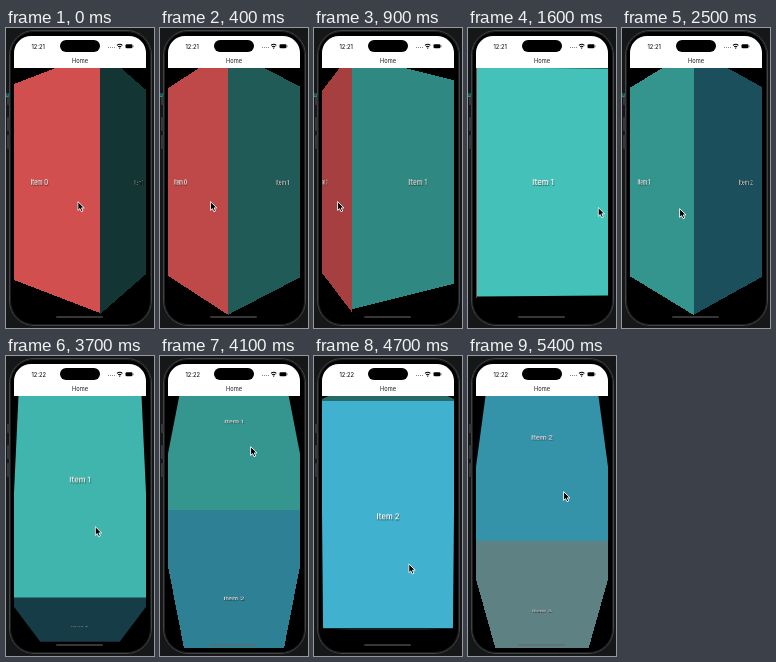
An HTML page that plays this animation: 148x300 px, repeating every 5.5 s.

```html
<!DOCTYPE html>
<html lang="en">
<head>
<meta charset="utf-8">
<title>Cube carousel</title>
<style>
  html, body { margin: 0; width: 100%; height: 100%; overflow: hidden; background: #161718; }
  body { position: relative; font-family: Inter, sans-serif; }
  body * { position: absolute; box-sizing: border-box; }
  #stage { left: 0; top: 0; width: 148px; height: 300px; overflow: hidden; }
  #code { left: -1px; top: 63px; font: bold 7px/9px "DejaVu Sans Mono", monospace; color: #1f9f98; }
  .key { left: 1px; width: 3px; background: #35373a; border-radius: 1px; }
  #phone { left: 2.5px; top: 2px; width: 143px; height: 296px; border: 1px solid #414244;
    border-radius: 25px; background: #000; box-shadow: inset 0 0 0 1px #1d1e20; }
  #screen { left: 8px; top: 8px; width: 131.5px; height: 284px; overflow: hidden;
    border-radius: 17px; background: #000; }
  .face { left: 0; top: 32px; width: 132px; height: 228px; display: flex; align-items: center;
    justify-content: center; backface-visibility: hidden; }
  .face i { inset: 0; }
  .face span { font-size: 7.6px; font-weight: 600; color: #fff; white-space: nowrap;
    text-shadow: .5px .6px 1px #0009; }
  #header { left: 0; top: 0; width: 132px; height: 32.4px; background: #fff; color: #1a1a1a; }
  #clock { left: 17.5px; top: 6.7px; font-size: 5.7px; line-height: 7px; font-weight: 500; }
  #title { left: 0; width: 132px; top: 21px; text-align: center; font-size: 5.7px;
    line-height: 7px; }
  #island { left: 46px; top: 4px; width: 40px; height: 12px; border-radius: 6px; background: #000; }
  #status { left: 92px; top: 6px; }
  #bar { left: 42px; top: 279.5px; width: 47px; height: 2px; border-radius: 1px; background: #6668; }
  #cursor { left: 0; top: 0; }
</style>
</head>
<body>
<div id="stage">
  <div id="phone"></div>
  <div class="key" style="top:68px;height:9px"></div>
  <div class="key" style="top:89px;height:14px"></div>
  <div class="key" style="top:107px;height:14px"></div>
  <div id="code">u</div>
  <div id="screen">
    <div id="cube"></div>
    <div id="header">
      <div id="clock"></div>
      <div id="island"></div>
      <svg id="status" width="32" height="10">
        <path d="M2 5.5h7" stroke="#888" stroke-dasharray="1 1"/>
        <path d="M11 3.4q2.7-2.3 5.4 0M12.2 4.8q1.5-1.2 3 0M13.2 6.1h1" fill="none" stroke="#000" stroke-width="1.1"/>
        <rect x="19.5" y="2.3" width="7" height="4" rx="1.2"/>
        <path d="M27.3 3.5v1.6" stroke="#777" stroke-width=".8"/>
      </svg>
      <div id="title">Home</div>
    </div>
    <div id="bar"></div>
  </div>
  <svg id="cursor" width="10" height="13">
    <path d="M.6.6v8.8l2-1.8 1.4 3.1 1.7-.7-1.4-3.1h2.7z" stroke="#fff" stroke-width=".9"/>
  </svg>
</div>
<script>
const LOOP = 5500, STEP = 100, CUT = 2600;
const WIDTH = 132, HEIGHT = 228;
const SLOP = 6;     // pixels a drag travels before the cube follows
const SETTLE = 215; // time constant of the snap after release
const colors = ['#ff6060', '#45c3bb', '#40b2cf', '#9ad3d8'];

// Pointer strokes; those with a page drag the cube away from it.
const strokes = [
  { start: -1030, end: 900, from: [126.5, 173], to: [23, 173], page: 0 },
  { start: 1650, end: 2500, from: [131, 179], to: [57, 180], page: 1 },
  { start: CUT, end: 3000, from: [86, 150], to: [86, 160] },
  { start: 3500, end: 4100, from: [88, 210], to: [90, 90], page: 1 },
  { start: 4900, end: 5400, from: [95, 229], to: [95, 135], page: 2 }
];
const drags = strokes.filter(s => 'page' in s);

const $ = id => document.getElementById(id);
const clamp = v => Math.min(1, Math.max(0, v));
const smooth = v => v * v * (3 - 2 * v);
const mix = (a, b, f) => a.map((v, i) => v + (b[i] - v) * f);
const progress = (t, start, end) => clamp((t - start) / (end - start));

const faces = colors.map((color, i) => {
  const face = document.createElement('div');
  face.className = 'face';
  face.innerHTML = `<i style="background:${color}"></i><span>Item ${i}</span>`;
  $('cube').append(face);
  return face;
});

function pointerAt(t) {
  const i = strokes.findLastIndex(s => s.start <= t);
  const stroke = strokes[i], next = strokes[i + 1];
  if (t <= stroke.end || !next)
    return mix(stroke.from, stroke.to, progress(t, stroke.start, stroke.end));
  return mix(stroke.to, next.from, smooth(progress(t, stroke.end, next.start)));
}

function positionAt(t) {
  const i = drags.findLastIndex(d => d.start <= t);
  const { start, end, from, to, page } = drags[i];
  const axis = start < CUT ? 0 : 1;
  const travel = (from[axis] - to[axis]) * progress(t, start, end);
  const position = page + Math.max(0, travel - SLOP) / (axis ? HEIGHT : WIDTH);
  if (t <= end) return position;
  const rest = drags[i + 1].page;
  return rest + (position - rest) * Math.exp((end - t) / SETTLE);
}

function shade(v, vertical) {
  if (v < 0) return clamp(1 + .47 * v);
  return Math.max(.15, vertical ? 1 - .85 * v ** 1.6 : 1 - 1.15 * v);
}

function draw(t) {
  const vertical = t >= CUT;
  const [x, y] = pointerAt(t);
  const position = positionAt(t);
  const size = vertical ? HEIGHT : WIDTH;
  const depth = size / 2 / Math.tan(Math.PI / 6); // six-sided prism
  faces.forEach((face, i) => {
    const v = i - position;
    const turn = vertical ? `rotateX(${-60 * v}deg)` : `rotateY(${60 * v}deg)`;
    const flare = `scale${vertical ? 'X' : 'Y'}(${1 + .04 * v * v})`;
    const light = shade(v, vertical);
    const [panel, label] = face.children;
    face.style.display = Math.abs(v) < 1.2 ? 'flex' : 'none';
    face.style.transform =
      `perspective(${size}px) translateZ(${-depth}px) ${turn} translateZ(${depth}px) ${flare}`;
    panel.style.filter = `brightness(${light})`;
    label.style.filter = `brightness(${Math.sqrt(light)})`;
  });
  $('cursor').style.transform = `translate(${x}px, ${y}px)`;
  $('clock').textContent = vertical ? '12:22' : '12:21';
  $('code').style.display = vertical ? 'none' : 'block';
}

const begin = performance.now();
function tick() {
  const t = (performance.now() - begin) % LOOP;
  draw(Math.floor(t / STEP) * STEP);
  requestAnimationFrame(tick);
}
tick();
</script>
</body>
</html>
```
